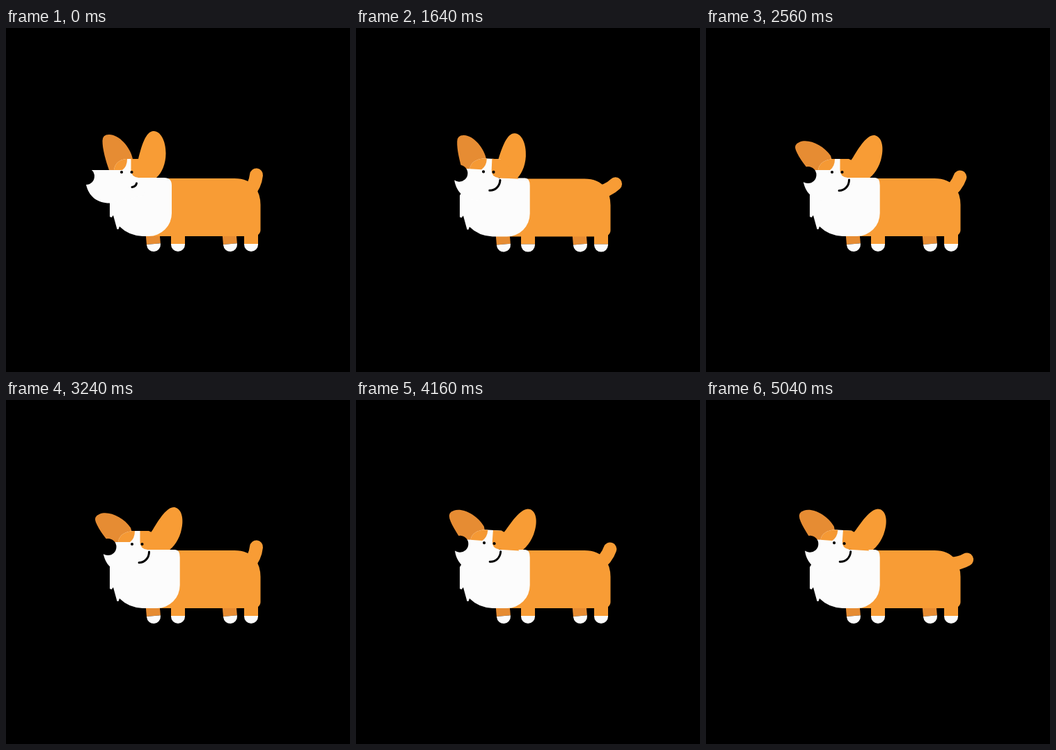
Animation of 494x494 px, one loop 5080 ms. Source, as an HTML page with a canvas:

```html
<!DOCTYPE html>
<html lang="en">
<head>
<meta charset="utf-8">
<title>Corgi</title>
<style>
  html, body { margin: 0; width: 100%; height: 100%; overflow: hidden; background: #000; }
  canvas { display: block; width: 494px; height: 494px; }
</style>
</head>
<body>
<canvas id="stage" width="494" height="494"></canvas>
<script>
const ctx = document.getElementById('stage').getContext('2d');
const LOOP = 5080, STEP = 40, WAG = 240;
const ORANGE = '#f89c35', SHADE = '#e68c33', WHITE = '#fcfcfc', BLACK = '#000';

const lerp = (a, b, k) => a + (b - a) * k;
const swing = k => (1 - Math.cos(Math.PI * k)) / 2;

// Sine ease from 0 to 1 between two times
const ease = (t, from, to) => swing(Math.min(1, Math.max(0, (t - from) / (to - from))));

function fill(color, d) {
  ctx.fillStyle = color;
  ctx.fill(new Path2D(d));
}

function dot(x, y, r) {
  ctx.fillStyle = BLACK;
  ctx.beginPath();
  ctx.arc(x, y, r, 0, Math.PI * 2);
  ctx.fill();
}

function stroke(color, width, d) {
  ctx.strokeStyle = color;
  ctx.lineWidth = width;
  ctx.lineCap = 'round';
  ctx.stroke(new Path2D(d));
}

// Draws with a turn about (x, y), then a shift
function turned(x, y, degrees, draw, dx = 0, dy = 0) {
  ctx.save();
  ctx.translate(x + dx, y + dy);
  ctx.rotate(degrees * Math.PI / 180);
  ctx.translate(-x, -y);
  draw();
  ctx.restore();
}

function leg(x, color, tilt) {
  turned(x, 311, tilt, () => {
    fill(color, `M${x - 10} 296h20v14h-20z`);
    fill(WHITE, `M${x - 10} 310h20v1a10 10 0 0 1-20 0z`);
  });
}

function body(wag) {
  turned(349.4, 234.8, 54 * wag, () =>
    stroke(ORANGE, 19, 'M347 238Q358 226 359.5 211'));
  leg(212, SHADE, -5);
  leg(322, SHADE, -5);
  fill(ORANGE, 'M205 216H328Q348 216 358 229Q365.5 239 365.5 254V290Q365.5 294 362 297V299H205Z');
  leg(247, ORANGE, 0);
  leg(352, ORANGE, 0);
}

function ears(turn, lay) {
  turned(159.5, 199.5, -22 * lay, () =>
    fill(SHADE, 'M148 204C143 190 138.5 174 138.5 162Q138.5 153 148 153C162 153 178 170 182 188L180 206Z'),
    3 * turn, 3 * turn);
  turned(207.4, 219, 17 * lay, () =>
    fill(ORANGE, 'M186 200L190 188C195 168 201 148 212 148C222 148 229.5 162 229.5 180C229.5 195 224 208 216 215L200 222Z'),
    11 * turn, 2 * turn);
}

function chest(turn) {
  const right = lerp(238, 249.7, turn), r = lerp(11, 7, turn);
  fill(WHITE, `M149 240L160 222L190 215H${right - r}Q${right} 215 ${right} 226V266
    A33 33 0 0 1 ${right - 33} 299H196Q176 298 163 285L161.5 289H159.5L154 269L151.5 272L149 271Z`);
}

function face(turn) {
  const mix = (a, b) => lerp(a, b, turn);
  const side = mix(155, 161), top = mix(172, 182);
  const patch = mix(174, 185), stripe = mix(179.5, 192.5);

  fill(WHITE, `M${mix(120, 146)} 204H${side}Q${side + 2} 190 ${top} 188H${mix(190, 205)}
    L${mix(190, 203)} 216L200 240L${mix(149, 174)} ${mix(251.5, 248.5)}
    c-18 0-30-9.5-34-26.5Z`);
  fill('#f59934', `M${side} 204Q${side + 2} 190 ${top} 188H${patch}Q${patch} 199 ${patch - 7} 204Z`);
  fill(ORANGE, `M${stripe} 188H${mix(191, 205)}L${mix(192, 209)} 190L${mix(216, 232)} 215
    H${stripe + 11}Q${stripe} 214 ${stripe} 204Z`);

  dot(mix(115, 146.5), mix(213, 211), 12);
  dot(mix(166, 181), 207, 2.1);
  dot(mix(180.5, 195.5), 207, 2.1);
  stroke(BLACK, 3, `M${mix(181, 191)} ${mix(228.5, 233.5)}
    C${mix(184, 199)} ${mix(228, 233.5)} ${mix(187, 205.5)} ${mix(226, 227)} ${mix(187.5, 205.5)} ${mix(223, 218)}`);
}

function draw(t) {
  const turn = ease(t, 1080, 1640);
  const lay = ease(t, 1600, 2040);
  const tilt = 4 * (ease(t, 1080, 2000) - ease(t, 2180, 2580) + ease(t, 3260, 3940));
  const wag = t < 1560 ? 0 : swing((t - 1560) / WAG * 2);
  const bob = 0.6 * Math.sin(Math.PI * ease(t, 1080, 2200));
  const inHead = part => turned(210, 250, tilt, part);

  ctx.fillStyle = BLACK;
  ctx.fillRect(0, 0, 494, 494);
  turned(0, 0, 0, () => {
    body(wag);
    inHead(() => ears(turn, lay));
    chest(turn);
    inHead(() => face(turn));
  }, 0, bob);
}

function tick() {
  const t = performance.now() % LOOP;
  draw(Math.floor(t / STEP) * STEP);
  requestAnimationFrame(tick);
}
tick();
</script>
</body>
</html>
```
